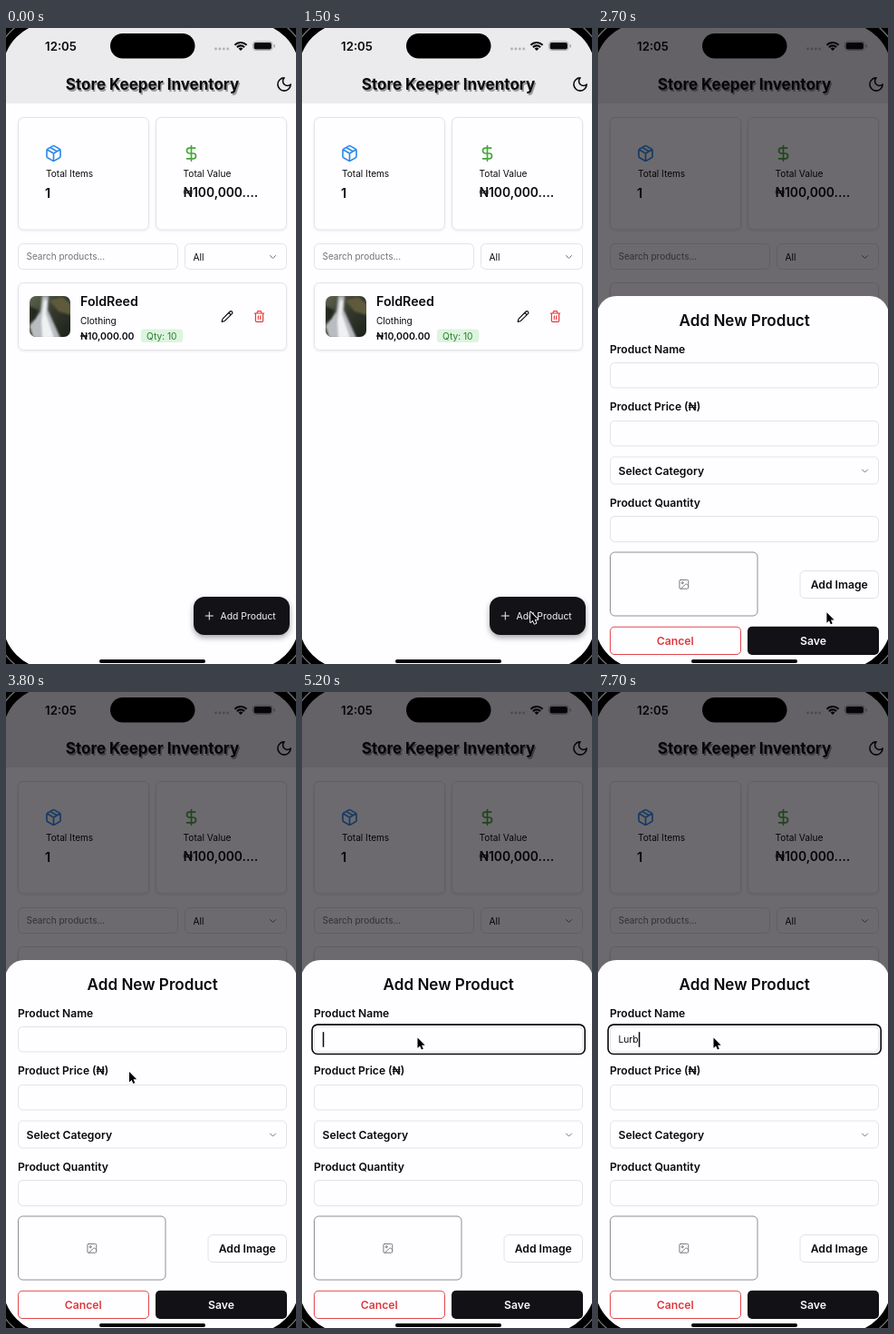
These frames come from a looping animation (320x700 px, 8000 ms). An HTML page with a canvas:

```html
<!DOCTYPE html>
<html lang="en">
<head>
<meta charset="utf-8">
<title>Store Keeper Inventory</title>
<style>
  html, body { margin: 0; width: 100%; height: 100%; overflow: hidden; background: #000; }
  canvas { display: block; width: 320px; height: 700px; }
</style>
</head>
<body>
<canvas id="stage"></canvas>
<script>
const W = 320, H = 700, LOOP = 8000, STEP = 100;
const canvas = document.getElementById('stage');
const ctx = canvas.getContext('2d');
const dpr = window.devicePixelRatio || 1;
canvas.width = W * dpr;
canvas.height = H * dpr;

const INK = '#09090b', PAPER = '#fefdff', LINE = '#e3e2e6', MUTED = '#737278';
const ITEM = 'FoldReed', TYPED = 'Lurb';

const ICONS = {
  box: 'M16.5 9.4 7.5 4.2M21 16V8a2 2 0 0 0-1-1.73l-7-4a2 2 0 0 0-2 0l-7 4A2 2 0 0 0 3 8v8a2 2 0 0 0 1 1.73l7 4a2 2 0 0 0 2 0l7-4A2 2 0 0 0 21 16ZM3.3 7 12 12l8.7-5M12 22V12',
  dollar: 'M12 2v20M17 5H9.5a3.5 3.5 0 0 0 0 7h5a3.5 3.5 0 0 1 0 7H6',
  moon: 'M12 3a6 6 0 0 0 9 9 9 9 0 1 1-9-9Z',
  pencil: 'M17 3a2.85 2.83 0 1 1 4 4L7.5 20.5 2 22l1.5-5.5ZM15 5l4 4',
  trash: 'M3 6h18M19 6v14a2 2 0 0 1-2 2H7a2 2 0 0 1-2-2V6M8 6V4a2 2 0 0 1 2-2h4a2 2 0 0 1 2 2v2M10 11v6M14 11v6',
  chevron: 'm6 9 6 6 6-6',
  plus: 'M5 12h14M12 5v14',
  image: 'M5 3h14a2 2 0 0 1 2 2v14a2 2 0 0 1-2 2H5a2 2 0 0 1-2-2V5a2 2 0 0 1 2-2ZM11 9a2 2 0 1 1-4 0 2 2 0 0 1 4 0M21 15l-3.1-3.1a2 2 0 0 0-2.8 0L6 21'
};
for (const name in ICONS) ICONS[name] = new Path2D(ICONS[name]);
const ARROW = new Path2D('M0 0V11.4L2.6 9 4.4 13 6.3 12.2 4.6 8.2H8.2Z');

// Pointer stops: time, x, y
const POINTER = [
  [300, 274, 693], [700, 243, 660], [1100, 252, 642.5], [3200, 252.5, 643.5],
  [3500, 153, 483], [3700, 153, 483], [3800, 136, 418], [4200, 127.5, 380.5]
];
const KEY_TIMES = [6400, 6700, 7500, 7700];

function rect(x, y, w, h, r) {
  ctx.beginPath();
  ctx.roundRect(x, y, w, h, r);
}

// Box given by its outer edges, with the border drawn inside.
function box(x1, y1, x2, y2, r, fill, line, lw = 1) {
  const i = line ? lw / 2 : 0;
  rect(x1 + i, y1 + i, x2 - x1 - 2 * i, y2 - y1 - 2 * i, r);
  if (fill) { ctx.fillStyle = fill; ctx.fill(); }
  if (line) { ctx.strokeStyle = line; ctx.lineWidth = lw; ctx.stroke(); }
}

function shadowed(color, blur, dy, draw) {
  ctx.save();
  ctx.shadowColor = color;
  ctx.shadowBlur = blur * dpr;
  ctx.shadowOffsetY = dy * dpr;
  draw();
  ctx.restore();
}

function setFont(size, weight) {
  ctx.font = `${weight} ${size}px Inter, Roboto, sans-serif`;
}

// y is the middle of the capital letters.
function text(str, x, y, size, weight = 400, color = INK, align = 'left') {
  setFont(size, weight);
  ctx.textAlign = align;
  ctx.fillStyle = color;
  ctx.fillText(str, x, y + size * 0.364);
}

function icon(name, cx, cy, size, color, lw = 2) {
  const k = size / 24;
  ctx.save();
  ctx.translate(cx - size / 2, cy - size / 2);
  ctx.scale(k, k);
  ctx.lineWidth = lw;
  ctx.lineCap = ctx.lineJoin = 'round';
  ctx.strokeStyle = color;
  ctx.stroke(ICONS[name]);
  ctx.restore();
}

function shape(points, color) {
  ctx.beginPath();
  points.forEach(([x, y]) => ctx.lineTo(x, y));
  ctx.fillStyle = color;
  ctx.fill();
}

function statusBar() {
  text('12:05', 60.5, 20, 13.2, 600, INK, 'center');
  ctx.fillStyle = '#b3b2b5';
  for (let i = 0; i < 4; i++) {
    ctx.beginPath();
    ctx.arc(231.5 + i * 4.4, 23, 1.4, 0, 7);
    ctx.fill();
  }
  ctx.strokeStyle = INK;
  ctx.lineWidth = 2.1;
  for (const r of [5.6, 9]) {
    ctx.beginPath();
    ctx.arc(259, 25, r, -Math.PI * 0.76, -Math.PI * 0.24);
    ctx.stroke();
  }
  ctx.beginPath();
  ctx.moveTo(259, 25);
  ctx.arc(259, 25, 3.3, -Math.PI * 0.76, -Math.PI * 0.24);
  ctx.fillStyle = INK;
  ctx.fill();
  box(272, 14.5, 294.5, 25, 3.2, null, '#a5a4a7', 0.9);
  box(273.6, 16.1, 292.9, 23.4, 2, INK);
  box(295.5, 18, 297, 21.6, 1, '#a5a4a7');
}

// Soft waterfall between dark rocks.
function thumbnail() {
  ctx.save();
  rect(26, 295, 45, 45, 7);
  ctx.clip();
  const g = ctx.createLinearGradient(26, 295, 71, 340);
  g.addColorStop(0, '#5d6350');
  g.addColorStop(0.5, '#34382c');
  g.addColorStop(1, '#1c211a');
  ctx.fillStyle = g;
  ctx.fillRect(26, 295, 45, 45);
  ctx.filter = `blur(${1.2 * dpr}px)`;
  shape([[48, 300], [62, 296], [72, 304], [72, 316], [58, 312]], '#5f5a3c');
  shape([[40, 295], [47, 295], [46, 310], [60, 341], [30, 341], [26, 328], [38, 312]], '#b9bcc0');
  shape([[42, 299], [45, 300], [44, 314], [53, 341], [40, 341], [39, 322]], '#f0f1f3');
  shape([[26, 306], [36, 311], [32, 320], [26, 324]], '#23281f');
  ctx.restore();
}

function statCard(x, draw) {
  shadowed('rgba(0,0,0,.07)', 3, 1, () => box(x, 98, x + 145, 222.5, 6, PAPER));
  box(x, 98, x + 145, 222.5, 6, PAPER, LINE);
  draw();
}

function home() {
  ctx.fillStyle = PAPER;
  ctx.fillRect(0, 0, W, H);
  ctx.fillStyle = '#ebeaec';
  ctx.fillRect(0, 0, W, 83);
  statusBar();
  text('Store Keeper Inventory', 162.9, 63.6, 17, 700, '#98979a', 'center');
  text('Store Keeper Inventory', 161.5, 62.2, 17, 700, INK, 'center');
  icon('moon', 307, 62, 19, INK);

  statCard(13, () => {
    icon('box', 52.5, 138, 20, '#2f8be6');
    text('Total Items', 44, 160.2, 10.1);
    text('1', 43, 181.3, 14.6, 600);
  });
  statCard(165, () => {
    icon('dollar', 204.5, 138, 20, '#46a63a');
    text('Total Value', 195.5, 159.8, 10.2);
    text('₦100,000.…', 195.5, 181, 13.8, 600);
  });

  box(13, 237, 190, 266, 5, PAPER, LINE);
  text('Search products...', 22.5, 251.8, 10, 400, MUTED);
  box(197, 237, 310, 266, 5, PAPER, LINE);
  text('All', 206.5, 251.8, 10.2);
  icon('chevron', 294.5, 252, 12, '#727176');

  shadowed('rgba(0,0,0,.08)', 3, 1, () => box(13, 280, 310, 355, 6, PAPER));
  box(13, 280, 310, 355, 6, PAPER, LINE);
  thumbnail();
  text(ITEM, 82, 301, 14.2, 600);
  text('Clothing', 82, 322, 10.1);
  text('₦10,000.00', 82, 338.7, 10.5, 600);
  box(149, 331.5, 195, 346, 3, '#dcf5de');
  text('Qty: 10', 171.8, 338.9, 10.2, 400, '#2c7a31', 'center');
  icon('pencil', 244, 317.5, 14, INK);
  icon('trash', 279.5, 317.5, 14, '#e5383b');

  shadowed('rgba(0,0,0,.35)', 6, 3, () => box(207, 626, 313, 668, 12, '#131217'));
  icon('plus', 224.3, 647, 14, '#f4f4f5', 1.7);
  text('Add Product', 236.5, 647.2, 10.4, 400, '#f4f4f5');
}

function field(y1, y2) {
  box(13, y1, 310, y2, 5, PAPER, LINE);
}

function caretOn(t) {
  if (t < 6000) return t < 5500;
  return t < 7300 || t >= 7500;
}

function nameInput(t) {
  if (t < 5200) return;
  box(10.3, 365.3, 313, 399.3, 6, null, INK, 1.6);
  const typed = TYPED.slice(0, KEY_TIMES.filter(k => t >= k).length);
  text(typed, 22.5, 382.7, 10.2);
  if (caretOn(t)) {
    setFont(10.2, 400);
    ctx.fillStyle = INK;
    ctx.fillRect(22.8 + ctx.measureText(typed).width, 374.2, 1.5, 16.6);
  }
}

function sheet(t) {
  ctx.fillStyle = 'rgba(4,0,6,.58)';
  ctx.fillRect(0, 0, W, H);
  rect(-1, 295, 322, 430, 21);
  ctx.fillStyle = PAPER;
  ctx.fill();
  text('Add New Product', 161.7, 321.3, 17.1, 600, INK, 'center');
  text('Product Name', 13, 354, 12.1, 600);
  field(368, 396.5);
  nameInput(t);
  text('Product Price (₦)', 13, 417, 12.1, 600);
  field(432, 460.5);
  field(471.5, 502.5);
  text('Select Category', 22.5, 487.5, 12.2, 600);
  icon('chevron', 294.5, 487.5, 12, '#727176');
  text('Product Quantity', 13, 523, 12.2, 600);
  field(537, 566);
  box(13, 576.5, 176.5, 647.5, 5, PAPER, '#8f8e93');
  icon('image', 94.8, 612.3, 13, '#6f6e74', 1.7);
  box(222.5, 597, 310, 628, 5, PAPER, LINE);
  text('Add Image', 266.2, 612.8, 12.2, 600, INK, 'center');
  box(13, 658.7, 158, 690, 4.5, PAPER, '#e0474c');
  text('Cancel', 85.2, 674.6, 12.2, 600, '#dc3a40', 'center');
  box(165, 658.7, 310, 690, 5, '#121116');
  text('Save', 237.5, 674.6, 12.2, 600, '#fafafa', 'center');
}

function device() {
  box(115, 6, 208.5, 33.5, 14, '#000');
  box(103, 695, 220, 699, 2, '#000');
  // Rounded screen corners with a thin metal edge.
  ctx.beginPath();
  ctx.rect(0, 0, W, H);
  ctx.roundRect(-4, -6, 328, 712, 54);
  ctx.fillStyle = '#000';
  ctx.fill('evenodd');
  rect(-13, -15, 346, 730, 63);
  ctx.strokeStyle = '#77767a';
  ctx.lineWidth = 1.2;
  ctx.stroke();
}

function pointerAt(t) {
  const next = POINTER.findIndex(p => p[0] > t);
  if (next < 0) return POINTER[POINTER.length - 1].slice(1);
  const [t0, x0, y0] = POINTER[next - 1], [t1, x1, y1] = POINTER[next];
  const k = (t - t0) / (t1 - t0);
  return [x0 + (x1 - x0) * k, y0 + (y1 - y0) * k];
}

function pointer(t) {
  if (t < POINTER[0][0]) return;
  ctx.save();
  ctx.translate(...pointerAt(t));
  ctx.lineJoin = 'round';
  ctx.lineWidth = 1.8;
  ctx.strokeStyle = '#fff';
  ctx.stroke(ARROW);
  ctx.fillStyle = '#000';
  ctx.fill(ARROW);
  ctx.restore();
}

const start = performance.now();
function frame() {
  const now = (performance.now() - start) % LOOP;
  const t = Math.floor(now / STEP) * STEP;
  ctx.setTransform(dpr, 0, 0, dpr, 0, 0);
  home();
  if (t >= 2700) sheet(t);
  device();
  pointer(t);
  requestAnimationFrame(frame);
}
frame();
</script>
</body>
</html>
```
